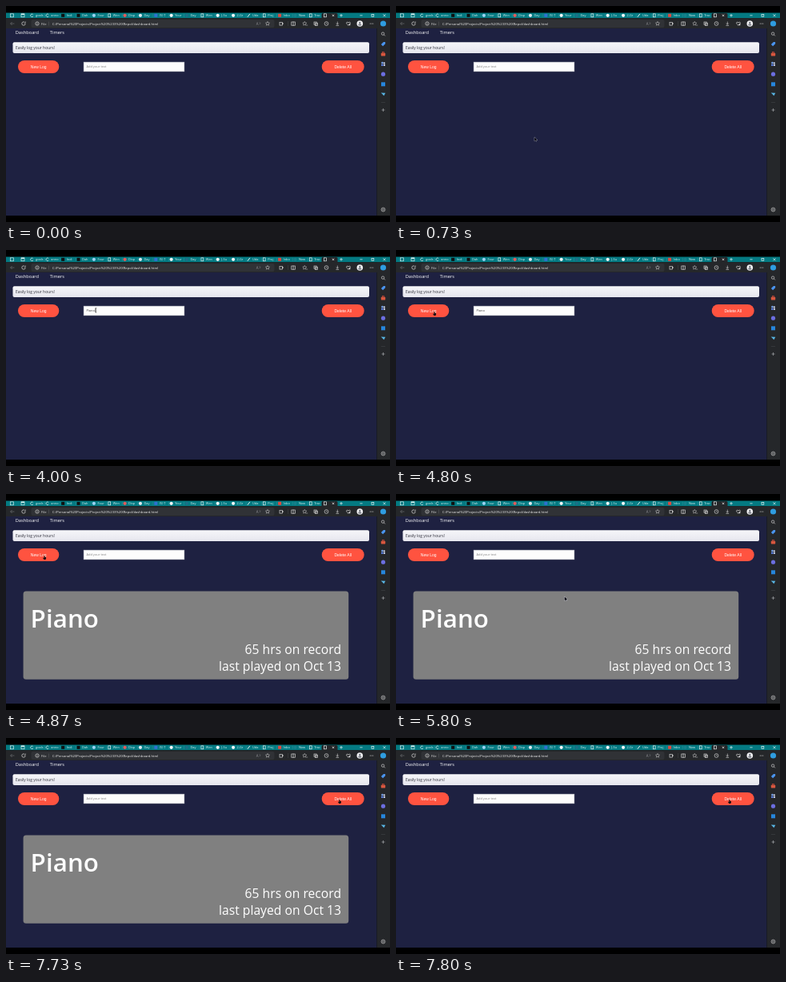
Recreate the animation shown at these times as an HTML page with a canvas. Size 480 by 270 pixels, loop 8000 ms.

```html
<!DOCTYPE html>
<html lang="en">
<head>
<meta charset="utf-8">
<title>Hour log</title>
<style>
html, body { margin: 0; width: 100%; height: 100%; overflow: hidden; background: #000; }
canvas { display: block; width: 480px; height: 270px; }
</style>
</head>
<body>
<canvas id="stage"></canvas>
<script>
const LOOP = 8000;
const canvas = document.getElementById('stage');
const dpr = window.devicePixelRatio || 1;
canvas.width = 480 * dpr;
canvas.height = 270 * dpr;
const ctx = canvas.getContext('2d');

const UI = '"Open Sans", "Noto Sans", sans-serif';
const ARIAL = '"Liberation Sans", Arial, sans-serif';

function rect(x, y, w, h, color) {
  ctx.fillStyle = color;
  ctx.fillRect(x, y, w, h);
}

function pill(x, y, w, h, r, color) {
  ctx.fillStyle = color;
  ctx.beginPath();
  ctx.roundRect(x, y, w, h, r);
  ctx.fill();
}

function dot(x, y, r, color) {
  ctx.fillStyle = color;
  ctx.beginPath();
  ctx.arc(x, y, r, 0, Math.PI * 2);
  ctx.fill();
}

function ring(x, y, r, color = '#d0d0d0', from = 0, to = Math.PI * 2) {
  ctx.strokeStyle = color;
  ctx.lineWidth = 0.7;
  ctx.beginPath();
  ctx.arc(x, y, r, from, to);
  ctx.stroke();
}

// Points are x, y pairs relative to (x, y).
function trace(x, y, pts) {
  ctx.beginPath();
  for (let i = 0; i < pts.length; i += 2) ctx.lineTo(x + pts[i], y + pts[i + 1]);
}

function line(x, y, pts, color = '#d0d0d0', width = 0.7) {
  trace(x, y, pts);
  ctx.strokeStyle = color;
  ctx.lineWidth = width;
  ctx.stroke();
}

function frame(x, y, w, h, color = '#d0d0d0') {
  ctx.strokeStyle = color;
  ctx.lineWidth = 0.7;
  ctx.strokeRect(x, y, w, h);
}

// Laid out large and scaled down, so tiny sizes keep their true widths.
function text(str, x, y, size, color, { font = UI, weight = 400, align = 'left' } = {}) {
  ctx.save();
  ctx.translate(x, y);
  ctx.scale(0.1, 0.1);
  ctx.font = `${weight} ${size * 10}px ${font}`;
  ctx.textAlign = align;
  ctx.fillStyle = color;
  ctx.fillText(str, 0, 0);
  ctx.restore();
}

function star(x, y, r) {
  const pts = [];
  for (let i = 0; i <= 10; i++) {
    const a = -Math.PI / 2 + i * Math.PI / 5;
    const d = i % 2 ? r * 0.5 : r;
    pts.push(d * Math.cos(a), d * Math.sin(a));
  }
  line(x, y, pts, '#d0d0d0', 0.55);
}

function page(x, y, color = '#e4eeee') {
  frame(x - 1.4, y - 2, 2.8, 4, color);
}

const tabs = [
  ['ring', '#e6f4f4', 'goals'], ['ring', '#e6f4f4', 'anno'], ['square', '#101010', 'Indi'],
  ['square', '#101010', 'Dah'], ['dot', '#9cd3f2', 'Four'], ['page', '#e4eeee', 'Wen'],
  ['dot', '#e25a5a', 'Disp'], ['dot', '#dce8ee', 'Day'], ['square', '#2f6fd0', '(5) T'],
  ['dot', '#f2f6f6', 'Your'], ['dot', '#1d6f86', 'Day'], ['page', '#e4eeee', 'Wen'],
  ['dot', '#f2f6f6', 'J-Su'], ['dot', '#f2f6f6', '2-Gr'], ['pen', '#e4eeee', 'Uda'],
  ['page', '#e4eeee', 'Proj'], ['square', '#e0483e', 'Inbo'], ['dot', '#177f8a', 'New'],
  ['page', '#e4eeee', 'Trac']
];

function drawTabs() {
  rect(0, 8.5, 480, 6.7, '#047a82');
  frame(5.5, 9.8, 4, 4, '#d5eeee');
  frame(19, 9.8, 4, 4, '#d5eeee');
  rect(19, 9.8, 4, 1.2, '#d5eeee');
  tabs.forEach(([kind, color, name], i) => {
    const x = 32.5 + i * 19.35, y = 11.8;
    if (kind === 'ring') ring(x, y, 1.8, color, 0.5, 5.6);
    else if (kind === 'square') rect(x - 2, y - 2, 4, 4, color);
    else if (kind === 'page') page(x, y, color);
    else if (kind === 'pen') line(x, y, [-1.5, 2, 1.5, -2], color, 1);
    else dot(x, y, 2.1, color);
    text(name, x + 4.5, 13.2, 3.9, '#d9eeee');
    rect(x + 15.8, 9.8, 0.4, 4, '#3f9ea3');
  });
  pill(394.5, 9, 20, 7, [1.5, 1.5, 0, 0], '#25272a');
  page(399, 11.8);
  line(409, 11.8, [-1.2, -1.2, 1.2, 1.2], '#f0f0f0');
  line(409, 11.8, [-1.2, 1.2, 1.2, -1.2], '#f0f0f0');
  line(419, 11.8, [-1.8, 0, 1.8, 0], '#e6f4f4');
  line(419, 11.8, [0, -1.8, 0, 1.8], '#e6f4f4');
  line(444, 11.8, [-1.6, 0, 1.6, 0], '#e6f4f4');
  frame(457, 10.4, 2.8, 2.8, '#e6f4f4');
  line(473, 11.8, [-1.5, -1.5, 1.5, 1.5], '#e6f4f4');
  line(473, 11.8, [-1.5, 1.5, 1.5, -1.5], '#e6f4f4');
}

function drawToolbar() {
  const y = 22;
  rect(0, 15.2, 480, 12.8, '#25272a');
  pill(31.5, 17, 304, 10, 2, '#303236');
  line(8, y, [2.4, 0, -2.4, 0], '#6c6e72');
  line(8, y, [-0.4, -2, -2.4, 0, -0.4, 2], '#6c6e72');
  ring(22, y, 2.2, '#d8d8d8', 0, 5.2);
  line(22, y, [2.3, -2.6, 2.3, -0.8, 0.6, -0.8], '#d8d8d8', 0.6);
  ring(39, y, 2.2);
  line(39, y, [0, -0.4, 0, 1.3]);
  dot(39, y - 1.2, 0.4, '#d0d0d0');
  text('File', 44, 23.6, 4.15, '#dedede');
  rect(53.5, 19.5, 0.4, 5, '#6a6c70');
  text('C:/Personal%20Projects/Project%20%233%20(Repo)/dashboard.html', 58, 23.6, 4.15, '#f0f0f0');

  text('A', 312.8, 24, 4.4, '#8f9195');
  line(317, y, [0, -1.8, 0.8, -0.4, 0, 1], '#8f9195', 0.5);
  star(327, y, 2.6);
  frame(342, 20.3, 3.6, 3.8);
  dot(345.8, 22, 0.9, '#d0d0d0');
  rect(352, 19, 0.4, 6, '#4c4e52');
  frame(356.8, 20, 4.6, 4.2);
  line(359.1, y, [0, -2.6, 0, 2.8]);
  star(373.3, y, 2.6);
  line(374, y, [1.3, 2, 3.2, 2], '#d0d0d0', 0.5);
  frame(385, 20, 3.2, 3.2);
  frame(386.4, 21.2, 3.2, 3.2);
  ring(400.5, y, 2.4);
  line(400.5, y, [0, -1.3, 0, 0.2, 1.2, 0.2], '#d0d0d0', 0.5);
  line(414.3, y, [0, -2.4, 0, 1.1]);
  line(414.3, y, [-1.4, -0.3, 0, 1.1, 1.4, -0.3]);
  line(414.3, y, [-1.8, 2.4, 1.8, 2.4]);
  line(428, y, [0, 2.4, -2.4, 0, -2.2, -1.5, -1, -2, 0, -1, 1, -2, 2.2, -1.5, 2.4, 0, 0, 2.4]);
  dot(429.4, 23.3, 1.1, '#d0d0d0');
  dot(442.3, y, 3.8, '#f2f2f4');
  dot(442.3, 21, 1.2, '#70747c');
  pill(440.3, 22.6, 4, 1.8, 0.9, '#70747c');
  for (let i = -1; i <= 1; i++) dot(457 + i * 1.8, y, 0.5, '#e0e0e0');
}

function drawSidebar() {
  const x = 471.5;
  rect(463.5, 15.2, 16.5, 246.8, '#25272a');
  dot(x, 22, 3.6, '#2f9de0');
  ring(x - 0.4, 34.6, 1.7);
  line(x, 35, [0.9, 0.9, 2.4, 2.4]);
  trace(x, 47.4, [-2.6, 0.6, 0.4, -2.4, 2.6, -2.4, 2.6, -0.2, -0.4, 2.8]);
  ctx.fillStyle = '#4a94ee';
  ctx.fill();
  frame(x - 1.1, 57.6, 2.2, 1.6, '#c84a3c');
  pill(x - 2.7, 58.8, 5.4, 3.6, 0.6, '#d8573f');
  dot(x - 1.1, 71, 1.2, '#7aa8f0');
  dot(x + 1.3, 71.4, 1.1, '#d9dff0');
  pill(x - 2.5, 72.6, 2.6, 2.4, 0.8, '#5a7fe0');
  pill(x + 0.4, 72.8, 2.1, 2.2, 0.8, '#c9cfe6');
  dot(x, 85.2, 2.6, '#6c6ee0');
  rect(x - 2.5, 95.3, 5, 5, '#2686dc');
  trace(x, 110, [-2.8, -1.6, 2.8, -1.2, 0.8, 2.2, -0.5, 0.8]);
  ctx.fillStyle = '#58b6e4';
  ctx.fill();
  rect(x - 2.6, 120.3, 5.2, 0.4, '#505256');
  line(x, 130, [-2, 0, 2, 0], '#b8babd', 0.6);
  line(x, 130, [0, -2, 0, 2], '#b8babd', 0.6);
  ring(x, 254.5, 2.4, '#c8c8c8');
  ring(x, 254.5, 0.9, '#c8c8c8');
}

function button(x, w, label) {
  pill(x, 68, w, 16, 8, '#ff5340');
  text(label, x + w / 2, 77.7, 5, '#fff', { font: ARIAL, align: 'center' });
}

const keyTimes = [2670, 2870, 3070, 3270, 3470];
const SAVED = 4870, CLEARED = 7800;

function drawPage(t) {
  rect(0, 28, 463.5, 234, '#1e2141');
  text('Dashboard', 11.7, 34.5, 5.7, '#fff');
  text('Timers', 54.8, 34.5, 5.7, '#fff');

  const shade = ctx.createLinearGradient(0, 45, 0, 59);
  shade.addColorStop(0, '#f6f6f9');
  shade.addColorStop(1, '#e6e6ee');
  pill(8.5, 45.2, 445.5, 13.8, 2, shade);
  text('Easily log your hours!', 11.9, 53.8, 4.95, '#2c2d38');

  button(15, 51.3, 'New Log');
  button(394.7, 53, 'Delete All');

  rect(97, 70, 126, 12, '#fdfdfd');
  frame(97.2, 70.2, 125.6, 11.6, '#b9bac4');
  const count = t < SAVED ? keyTimes.filter(k => t >= k).length : 0;
  const typed = 'Piano'.slice(0, count);
  if (count) text(typed, 100.4, 77, 4, '#444');
  else text('Add your text', 100.4, 77, 4, '#858585');
  if (t >= 2330 && t < 4600) {
    ctx.font = `40px ${UI}`;
    rect(100.5 + ctx.measureText(typed).width / 10, 73, 0.4, 4.8, '#222');
  }

  if (t >= SAVED && t < CLEARED) {
    pill(21.6, 121.4, 406.6, 110.4, 3.5, '#808080');
    text('Piano', 30.6, 167.3, 31.4, '#fff', { weight: 600 });
    text('65 hrs on record', 419, 200, 15.7, '#fff', { align: 'right' });
    text('last played on Oct 13', 419, 221, 15.7, '#fff', { align: 'right' });
  }
}

// Pointer tip: time, x, y
const path = [
  [70, 188, 258], [730, 173.2, 164], [1000, 170, 180], [1730, 82.2, 95.3],
  [2330, 112.4, 75.3], [4000, 112.4, 75.3], [4600, 46.5, 79], [4800, 48, 77],
  [5070, 48, 77], [5500, 140, 172], [5870, 217.8, 124], [6130, 217.8, 124],
  [6400, 300, 186], [6730, 434.4, 99.5], [6930, 434.4, 99.5], [7300, 444, 90],
  [7730, 416.8, 77]
];

function pointerAt(t) {
  const i = path.findIndex(k => k[0] > t);
  if (i < 0) return path[path.length - 1].slice(1);
  const [t0, x0, y0] = path[i - 1], [t1, x1, y1] = path[i];
  const u = (t - t0) / (t1 - t0), e = u * u * (3 - 2 * u);
  return [x0 + (x1 - x0) * e, y0 + (y1 - y0) * e];
}

const inside = (x, y, l, t, r, b) => x > l && x < r && y > t && y < b;

function drawPointer(t) {
  if (t < path[0][0]) return;
  const [x, y] = pointerAt(t);
  if (inside(x, y, 97, 70, 223, 82)) {
    line(x, y, [0, -2.8, 0, 2.8], '#222', 0.6);
    line(x, y, [-0.9, -2.8, 0.9, -2.8], '#222', 0.4);
    line(x, y, [-0.9, 2.8, 0.9, 2.8], '#222', 0.4);
    return;
  }
  if (inside(x, y, 15, 68, 66, 84) || inside(x, y, 395, 68, 448, 84)) {
    trace(x, y, [-0.5, 0, 0.4, 0, 0.5, 1.6, 2, 2, 2.2, 3.4, 1.5, 5, -0.5, 5, -1.8, 3.2, -1.2, 2.6, -0.5, 3.1]);
    ctx.fillStyle = '#1c1013';
  } else {
    trace(x, y, [0, 0, 0, 4.9, 1.2, 3.9, 2, 5.2, 2.6, 4.9, 2, 3.6, 3.4, 3.4]);
    ctx.fillStyle = '#0a0b14';
    ctx.strokeStyle = '#e4e5ee';
    ctx.lineWidth = 0.6;
    ctx.closePath();
    ctx.stroke();
  }
  ctx.fill();
}

const start = performance.now();
function draw() {
  const t = (performance.now() - start) % LOOP;
  ctx.setTransform(dpr, 0, 0, dpr, 0, 0);
  rect(0, 0, 480, 270, '#000');
  drawPage(t);
  drawTabs();
  drawToolbar();
  drawSidebar();
  drawPointer(t);
  requestAnimationFrame(draw);
}
draw();
</script>
</body>
</html>
```
